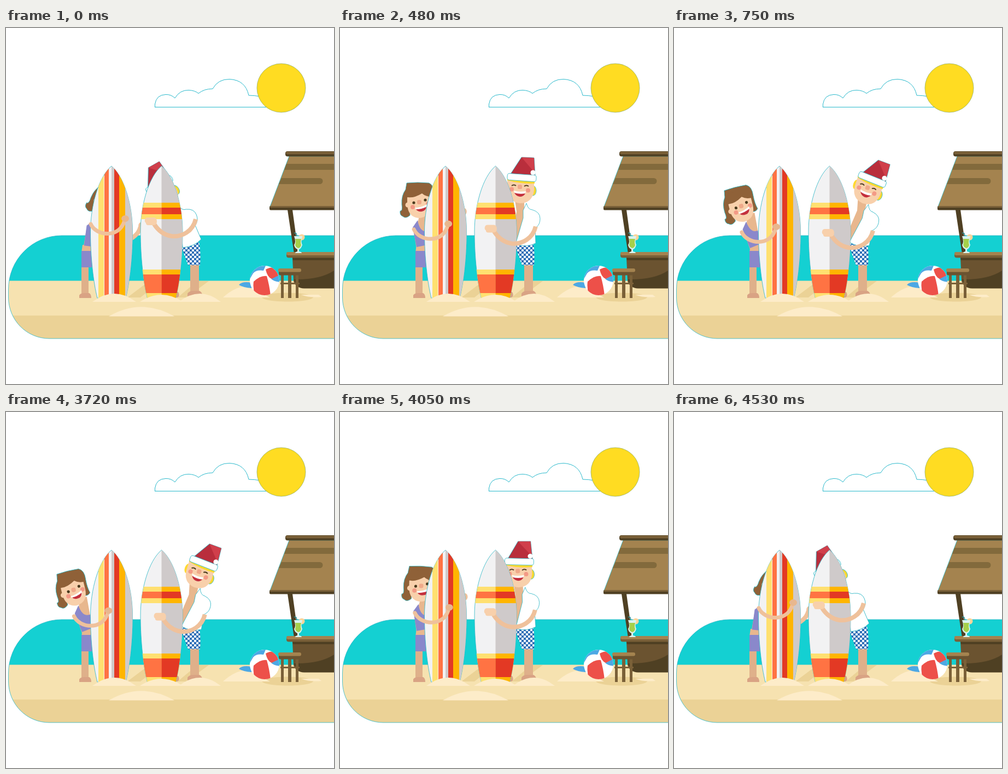
Write an HTML page that moves like this. It is 600 px wide and 650 px high and loops after 5.25 s.

```html
<!DOCTYPE html>
<html lang="en">
<head>
<meta charset="utf-8">
<title>Beach surfers</title>
<style>
html, body { margin: 0; width: 100%; height: 100%; overflow: hidden; background: #fff; }
svg { display: block; }
.edge { stroke: #2ab5c4; stroke-width: .8; }
.skin { fill: #e8b78e; }
.face { fill: #f8d0ab; }
.leg { fill: #dfb08a; }
.foot { fill: #d9a384; }
.purple { fill: #8a88cb; }
.hair { fill: #8f6138; }
.blond { fill: #ffd92e; }
.cheek { fill: #f39a86; }
.nose { fill: #efa98a; }
.lips { fill: #c4303c; }
.white { fill: #fff; }
.grey { fill: #cfcaca; }
.pale { fill: #f2f2f3; }
.lemon { fill: #ffe070; }
.amber { fill: #ffb500; }
.orange { fill: #ff7343; }
.red { fill: #e33924; }
.dune { fill: #fdecc9; }
.sand { fill: #ebd296; }
.wood { fill: #a4834f; }
.wood2 { fill: #7a6038; }
.wood3 { fill: #4f4023; }
.arm { fill: none; stroke: #efc19b; stroke-width: 8; stroke-linecap: round; }
.lid { fill: none; stroke: #4a3a1e; stroke-width: 2; }
</style>
</head>
<body>
<svg width="600" height="650" viewBox="0 0 600 650">
  <defs>
    <path id="board" d="M0 252C-24 272-38.500 325-38.500 372C-38.500 420-33 465-26 493H26C33 465 38.500 420 38.500 372C38.500 325 24 272 0 252z"/>
    <clipPath id="boardClip"><use href="#board"/></clipPath>
    <clipPath id="panelClip"><path id="panel" d="M601 379H102A97.500 98 0 0 0 4.500 477V492A74.500 75 0 0 0 79 567H601z"/></clipPath>
    <clipPath id="ballClip"><circle cx="473" cy="461" r="27"/></clipPath>
    <pattern id="dots" width="8" height="8" patternUnits="userSpaceOnUse">
      <rect width="8" height="8" fill="#2b6cb5"/>
      <g class="white"><circle cx="2" cy="2" r="2.200"/><circle cx="6" cy="6" r="2.200"/></g>
    </pattern>
  </defs>

  <!-- sky -->
  <g fill="none" stroke="#2ab9cc">
    <path d="M272.500 144V139Q275 122 292 121.500Q302 121 309 128Q318 113 334 113.500Q346 114 352 119.500Q362 111 378 111Q388 93 409 93.500Q438 95 444 123Q454 123 465 125M272 144.500H478"/>
  </g>
  <circle cx="503.500" cy="109.500" r="44.500" fill="#ffdc22" stroke="#6f9a5c" stroke-width=".6"/>

  <!-- sea and sand -->
  <g clip-path="url(#panelClip)">
    <rect y="379" width="600" height="83" fill="#14d0d2"/>
    <rect y="461.500" width="600" height="64" fill="#f6e2b0"/>
    <rect y="525" width="600" height="43" class="sand"/>
    <path class="sand" d="M222 492L262 462H284L246 492zM314 492L350 462H371L330 492z"/>
  </g>
  <use href="#panel" fill="none" class="edge"/>
  <ellipse class="sand" cx="515" cy="491.500" rx="47" ry="8"/>
  <path class="dune" d="M397 492Q416 474 441 470L483 492zM540 487H572L577 491Q555 493 540 487z"/>

  <!-- hut -->
  <path class="wood3" d="M515 332H524L535 412H527zM524 419H600V429H526z"/>
  <path d="M524 419H600V475H545Q530 475 526 462z" fill="#6b5330"/>
  <path class="wood3" d="M524 419H600V424H525zM600 443Q574 460 527 459Q531 475 545 475.500H600z"/>
  <rect class="wood2" x="513" y="409" width="100" height="10.500" rx="4"/>
  <rect class="wood" x="513" y="409" width="100" height="6" rx="3"/>
  <path class="wood edge" d="M518 234H601V326H483z"/>
  <path d="M513 248H600V259H509zM504 274H574A5.500 5.500 0 0 1 574 285H499z" fill="#826a3c"/>
  <rect class="wood3" x="482" y="325" width="130" height="7.500" rx="2"/>
  <rect class="wood2" x="483" y="325" width="130" height="3"/>
  <rect class="wood3" x="511" y="225" width="100" height="9.500" rx="4"/>
  <rect class="wood2" x="512" y="225.500" width="100" height="5" rx="2.500"/>

  <!-- drink -->
  <circle cx="541" cy="382" r="5.500" fill="#fbd49a"/>
  <path d="M534 388L531 375L527 374" fill="none" stroke="#2a8f96" stroke-width="1.500"/>
  <path d="M527 380H542Q539 391 542 396Q540 403 536 404V408Q541 409 541 411H529Q529 409 533 408V404Q528 402 527 396Q531 391 527 380z" fill="#d9f3f0"/>
  <path d="M529 385H540Q538 392 540 396Q539 401 535 402Q530 401 529 396Q531 391 529 385z" fill="#a5d04a"/>

  <!-- ball -->
  <path d="M426 469Q432 462 449 465V475Q434 474 426 469z" fill="#4da8e4"/>
  <g clip-path="url(#ballClip)">
    <rect class="white" x="440" y="430" width="70" height="60"/>
    <g fill="#4da8e4"><path d="M444 452Q450 434 475 434L471 443Q458 441 452 448L444 462z"/><path d="M485 458L502 449V464Q490 463 485 458z"/></g>
    <path d="M453 463Q466 451 477 453Q482 470 484 489H456Q451 475 453 463zM475 441Q483 436 489 438Q497 444 498 452L486 458Q478 455 475 441z" fill="#ed5049"/>
  </g>

  <!-- stool -->
  <path class="wood2" d="M503 450H508V493H503zM516 450H522V493H516zM530 450H535V493H530zM502 465H537V468H502z"/>
  <rect x="499" y="440" width="40" height="11.500" rx="3" fill="#6b5330"/>
  <rect class="wood" x="498" y="439" width="42" height="6.500" rx="3"/>

  <!-- woman -->
  <g id="wave"><path class="arm" d="M205 378Q231 368 235 352"/><ellipse cx="237" cy="348" rx="5" ry="6.500" fill="#efc19b"/></g>
  <path class="leg" d="M138 434H151V488H138z"/>
  <path class="foot" d="M134 493V488Q136 484 144 484H152Q156 486 156 493z"/>
  <path class="skin" d="M140 396H158V410H138z"/>
  <path class="purple" d="M138 407H157V437H138z"/>
  <g id="herBody">
    <path class="skin" d="M146 338H160V404H140L134 366L143 352z"/>
    <path class="purple" d="M133 364L142 351Q146 374 160 371V396L140 400z"/>
  </g>
  <g id="herHead">
    <path class="hair edge" d="M122 283Q142 281 163 283Q173 288 171 305Q170 320 173 330Q168 336 160 332L128 322V342Q120 349 115 344Q109 342 110 334Q115 335 113 322Q112 306 120 295z"/>
    <circle class="face" cx="124" cy="323" r="4.500"/>
    <path class="face" d="M123 302Q142 290 166 303V322Q165 346 144 347Q124 345 123 322z"/>
    <path class="hair" d="M121 310V290H168L170 308Q158 309 150 302Q135 311 124 309z"/>
    <g fill="#4a3a1e"><circle cx="135" cy="319" r="2.600"/><circle cx="156" cy="314" r="2.600"/></g>
    <rect class="nose" x="141" y="314" width="8" height="8" rx="3"/>
    <circle class="cheek" cx="133" cy="327" r="4"/><circle class="cheek" cx="161" cy="321" r="4"/>
    <path class="white" d="M137 328Q148 328 159 322Q159 334 150 335Q141 336 137 328z"/>
    <path class="lips" d="M139 331Q149 331 158 326.500Q157 334 150 335Q142 336 139 331z"/>
  </g>

  <!-- man -->
  <path class="leg" d="M337 430H353V484H337z"/>
  <path class="foot" d="M332 490V485Q335 480 342 480H354Q359 482 359 490zM300 482H315Q319 489 314 492H300z"/>
  <path d="M316 391H353Q357 410 355 433H333L324 408z" fill="url(#dots)"/>
  <g id="hisBody">
    <path class="white" d="M306 330H325V390H306z"/>
    <path class="skin" d="M320 314H337V348L322 390H312L323 335z"/>
    <path class="white edge" d="M335 333L341 320Q344 332 352 332Q366 336 366 348Q366 358 360 363L357 366L358 393Q342 401 321 395L335 347z"/>
  </g>
  <g id="hisHead">
    <ellipse class="blond edge" cx="353" cy="297" rx="6" ry="9"/>
    <ellipse class="blond" cx="307" cy="291" rx="5" ry="9"/>
    <path class="face" d="M306 274L355 277V296Q352 320 329 320Q307 317 306 294z"/>
    <path class="blond" d="M306 274L356 277V284Q330 285 306 278z"/>
    <path class="edge" d="M311 268L332 236L355 237L357 270z" fill="#b92e3c"/>
    <path d="M332 236L355 237L356 264z" fill="#d03f4b"/>
    <rect class="white edge" x="306" y="267" width="53" height="12" rx="4" transform="rotate(4 332 273)"/>
    <circle class="white" cx="353" cy="264" r="4.500"/>
    <path class="lid" d="M314 288Q318 285 322 288M337 289Q341 286 345 289"/>
    <rect class="nose" x="325" y="286" width="8" height="8" rx="2.500"/>
    <circle class="cheek" cx="314" cy="294.500" r="4"/><circle class="cheek" cx="344" cy="296.500" r="4"/>
    <path class="white" d="M318 297Q328 300 340 298Q338 308 329 308Q320 307 318 297z"/>
    <path class="lips" d="M319 301Q329 304 339 302Q336 308 329 308Q322 307 319 301z"/>
  </g>

  <!-- boards -->
  <g transform="translate(193)">
    <use href="#board" class="pale edge"/>
    <g clip-path="url(#boardClip)">
      <path class="grey" d="M0 250H40V495H0z"/>
      <path class="lemon" d="M-24 250H-14V495H-24z"/>
      <path class="orange" d="M-13 250H-5V495H-13z"/>
      <path class="red" d="M5 250H14V495H5z"/>
      <path class="amber" d="M14 250H25V495H14z"/>
    </g>
  </g>
  <g transform="translate(284.500)">
    <use href="#board" class="pale edge"/>
    <g clip-path="url(#boardClip)">
      <path class="grey" d="M0 250H40V495H0z"/>
      <path class="lemon" d="M-40 319H0V349H-40zM-40 441H0V495H-40z"/>
      <path class="amber" d="M0 319H40V349H0zM0 441H40V495H0z"/>
      <path class="orange" d="M-40 328H0V340H-40zM-40 450H0V484H-40z"/>
      <path class="red" d="M0 328H40V340H0zM0 450H40V484H0z"/>
    </g>
  </g>

  <!-- arms in front -->
  <g id="herArm">
    <path class="arm" style="stroke-width:7" d="M155 358C165 380 206 384 216 354"/>
    <ellipse cx="218" cy="348" rx="7" ry="6" fill="#e8b78e"/>
  </g>
  <g id="hisArm">
    <path class="arm" style="stroke-linecap:butt" d="M347 349C342 371 322 382 303 380Q283 377 271 358"/>
    <path class="face" d="M259 346H271Q276 347 276 353Q276 360 270 360H260Q256 360 256 356Q253 354 254 350Q255 346 259 346z"/>
  </g>

  <path class="dune" d="M158 500Q198 470 238 500zM245 500Q284 474 324 500zM316 500Q355 470 393 500zM188 526.500Q248 492 308 526.500z"/>
</svg>
<script>
const LOOP = 5250, STEP = 30, IN_END = 750, OUT_START = 3710, OUT_END = 4530;
const REST = 0.64; // share of the lean at which the bodies are drawn

const pose = (id, transform) => document.getElementById(id).setAttribute("transform", transform);
const clamp = x => Math.min(1, Math.max(0, x));

function leanAt(t) {
  return t < OUT_START ? clamp(t / IN_END) : clamp((OUT_END - t) / (OUT_END - OUT_START));
}

function draw() {
  const t = Math.floor(performance.now() % LOOP / STEP) * STEP;
  const p = leanAt(t), q = p - REST;
  pose("herHead", `rotate(${-40 * q} 162 409)`);
  pose("herBody", `rotate(${-29 * q} 150 407)`);
  pose("herArm", `translate(${-31 * p} ${15 * p})`);
  pose("wave", `translate(${-32 * (p - 0.32)} ${p < 0.32 ? 13 - 40 * p : -40 * (p - 0.32)})`);
  pose("hisHead", `rotate(${40 * q} 335 390) rotate(${10 * q} 330 290)`);
  pose("hisBody", `rotate(${33 * q} 338 392)`);
  pose("hisArm", `translate(${17 * p} ${21 * p})`);
  requestAnimationFrame(draw);
}
draw();
</script>
</body>
</html>
```
